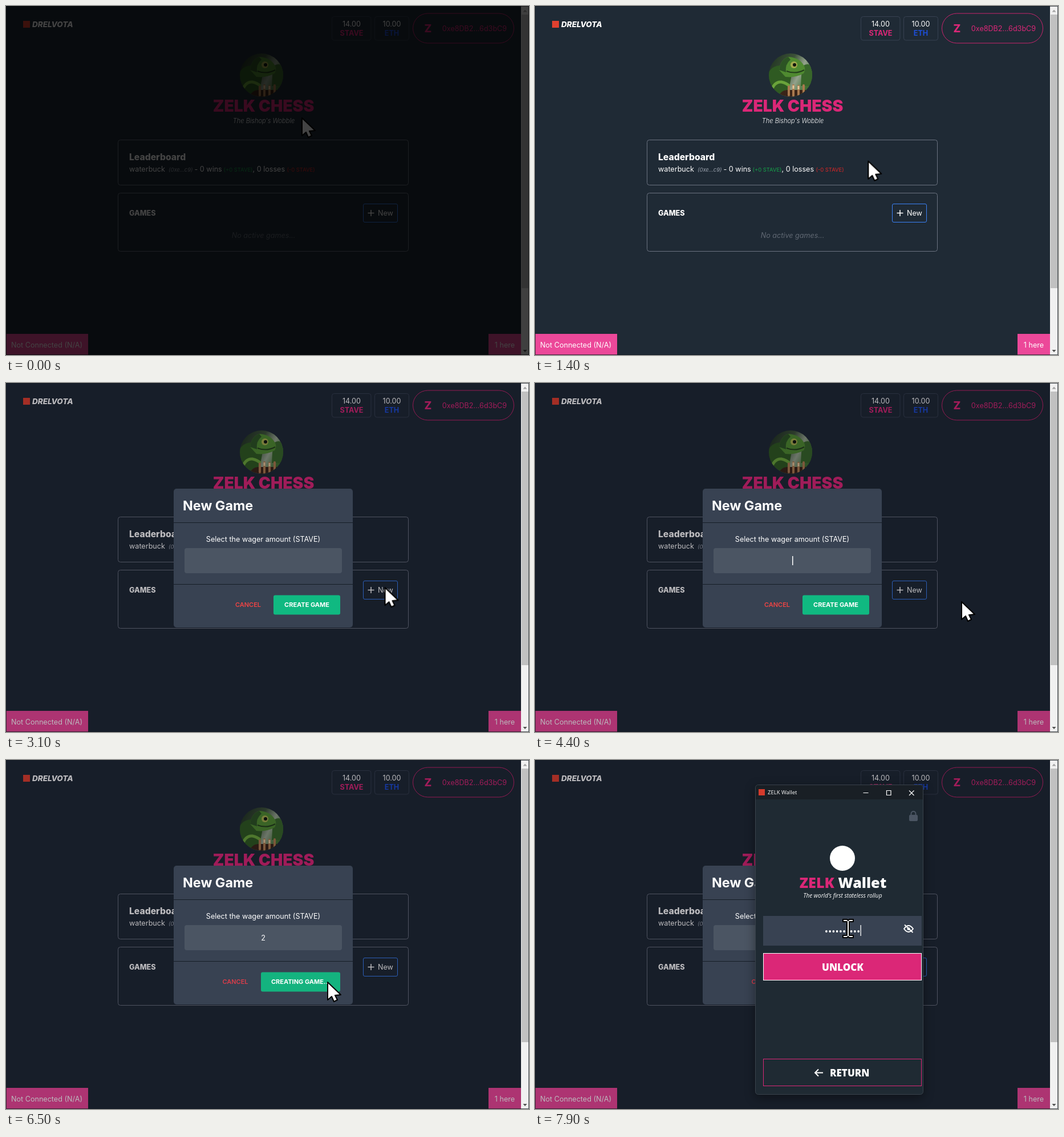
An HTML page for the animation above (8000 ms loop, 917x611 px).

```html
<!DOCTYPE html>
<html lang="en">
<head>
<meta charset="utf-8">
<title>Chess lobby</title>
<style>
  html, body { margin: 0; width: 100%; height: 100%; overflow: hidden; background: #1f2a35; }
  svg { display: block; width: 100%; height: 100%; }
  text { font: 400 12.6px Inter, sans-serif; fill: #fff; white-space: pre; }
  .mid { text-anchor: middle; }
  .bold { font-weight: 700; }
  .heavy { font-weight: 800; }
  .italic { font-style: italic; }
  .small { font-size: 11px; }
  .tiny { font-size: 9.44px; }
  .pink { fill: #db2777; }
  .outline { fill: none; stroke: #6b7280; }
  .badge { fill: none; stroke: #374151; }
  .wallet { filter: drop-shadow(0 5px 9px rgba(0, 0, 0, .4)); }
  .wallet text { font-family: "Open Sans", sans-serif; }
  .wallet .button { font-size: 17px; font-weight: 800; }
  .icon { fill: none; stroke: #fff; stroke-width: 1.2; }
  .pointer path { fill: #fff; stroke: #000; stroke-width: 2; stroke-linejoin: round; }
</style>
</head>
<body>
<svg viewBox="0 0 917 611" preserveAspectRatio="none">
  <defs>
    <clipPath id="round"><circle cx="448" cy="121" r="38"/></clipPath>
    <linearGradient id="leaves" x2="1" y2=".5">
      <stop offset="0" stop-color="#1c2f1e"/>
      <stop offset=".5" stop-color="#3c5138"/>
      <stop offset=".75" stop-color="#93a28c"/>
      <stop offset="1" stop-color="#3f6f31"/>
    </linearGradient>
  </defs>

  <rect width="917" height="611" fill="#1f2a35"/>

  <!-- header -->
  <rect x="30" y="26" width="12" height="12" fill="#e0402f"/>
  <text class="heavy italic" x="46" y="37" style="font-size:13.5px">DRELVOTA</text>
  <rect class="badge" x="571.5" y="18.5" width="68.5" height="41.5" rx="4"/>
  <text class="mid" x="606" y="36">14.00</text>
  <text class="mid bold pink" x="606" y="51.5">STAVE</text>
  <rect class="badge" x="646.5" y="18.5" width="60" height="41.5" rx="4"/>
  <text class="mid" x="676.5" y="36">10.00</text>
  <text class="mid bold" x="676.5" y="51.5" style="fill:#1d4ed8">ETH</text>
  <rect x="713.5" y="13" width="177" height="52" rx="26" fill="none" stroke="#c8246d"/>
  <text class="mid heavy pink" x="740" y="46" style="font-size:18.9px">Z</text>
  <text class="mid pink" x="821.5" y="44">0xe8DB2...6d3bC9</text>

  <!-- picture -->
  <g clip-path="url(#round)">
    <rect x="410" y="83" width="76" height="76" fill="url(#leaves)"/>
    <path d="M468 106q10-8 20 0v34h-22z" fill="#38662a"/>
    <path d="M408 160v-40q6-16 24-16l18 16-4 22-12 18z" fill="#2f5a22"/>
    <path d="M428 112q2-18 16-23 20 1 28 16 3 6-1 13-14 8-32 6z" fill="#4f8a30"/>
    <path d="M428 112q2-18 16-23l4 5q-10 8-8 22z" fill="#2c5424"/>
    <path d="M441 114q16 6 31-2" fill="none" stroke="#233f1c" stroke-width="2"/>
    <circle cx="454" cy="103" r="6" fill="#a3ab4c"/>
    <circle cx="455" cy="103" r="3" fill="#11160e"/>
    <path d="M414 150q5-18 18-17 9 2 14 7" fill="none" stroke="#6aa33a" stroke-width="5"/>
    <path d="M426 160q4-12 16-13h36v13z" fill="#3a2418"/>
    <path d="M445 156v-15m8 16v-18m9 18v-17m9 14v-15" stroke="#a9794e" stroke-width="4" stroke-linecap="round"/>
    <path d="M453 139v6m9-5v6" stroke="#e2c79c" stroke-width="3"/>
  </g>

  <text class="mid pink" x="451.5" y="185" style="font-size:28.3px;font-weight:900">ZELK CHESS</text>
  <text class="mid small italic" x="452" y="205" style="font-weight:300">The Bishop's Wobble</text>

  <!-- cards -->
  <rect class="outline" x="196.5" y="234.5" width="509" height="79" rx="4"/>
  <text class="heavy" x="216" y="269.5" style="font-size:15.7px">Leaderboard</text>
  <text x="216" y="289.8">waterbuck</text>
  <text class="tiny italic" x="285" y="289.5" style="fill:#9ca3af">(0xe...c9)</text>
  <text x="330.5" y="289.8">- 0 wins</text>
  <text class="tiny" x="381.5" y="289.5" style="fill:#16a34a">(+0 STAVE)</text>
  <text x="432.5" y="289.8">, 0 losses</text>
  <text class="tiny" x="492.5" y="289.5" style="fill:#dc2626">(-0 STAVE)</text>

  <rect class="outline" x="196.5" y="327.5" width="509" height="102" rx="4"/>
  <text class="heavy" x="216" y="367">GAMES</text>
  <text class="mid italic" x="451.5" y="405.5" style="fill:#606873">No active games...</text>
  <rect x="626.5" y="346.5" width="60" height="32" rx="2.5" fill="none" stroke="#3b82f6"/>
  <rect data-show="2000-2500" x="626" y="346" width="61" height="33" rx="3" fill="#3b82f6"/>
  <path d="M634.5 362.5h11m-5.5-5.5v11" stroke="#fff" stroke-width="1.5"/>
  <text x="652" y="367">New</text>

  <!-- status bars -->
  <rect y="574" width="144" height="37" fill="#ec4899"/>
  <text x="9" y="597.6">Not Connected (N/A)</text>
  <rect x="846" y="574" width="57" height="37" fill="#ec4899"/>
  <text class="mid" x="874.5" y="597.6">1 here</text>

  <!-- dialog -->
  <g id="dialog">
    <rect width="903" height="611" fill="rgb(4,2,14)" fill-opacity=".27"/>
    <rect x="294" y="185" width="314" height="243" rx="5" fill="#384252"/>
    <path d="M294 244.5h314M294 352.5h314" stroke="#161d27"/>
    <text class="bold" x="310" y="223" style="font-size:23.4px">New Game</text>
    <text class="mid" x="451" y="278">Select the wager amount (STAVE)</text>
    <rect x="313" y="289" width="276" height="44" rx="4" fill="#4b5563"/>
    <rect data-show="2400-2900 3400-3900 4400-4700" x="451" y="303" width="1.5" height="16" fill="#fff"/>
    <text data-show="4700-8000" class="mid" x="451" y="315.5">2</text>
    <rect data-show="4700-5200 5700-6200" x="455" y="303" width="1.5" height="16" fill="#fff"/>
    <g data-show="0-6200">
      <text class="mid small" x="424.5" y="392" style="fill:#ef4444;font-weight:600">CANCEL</text>
      <rect x="469" y="371.5" width="117" height="34" rx="3" fill="#10b981"/>
      <text class="mid small bold" x="527.5" y="392">CREATE GAME</text>
    </g>
    <g data-show="6200-8000">
      <text class="mid small" x="402" y="392" style="fill:#dc3d4a;font-weight:600">CANCEL</text>
      <rect x="447" y="371.5" width="139" height="34" rx="3" fill="#14b37f"/>
      <text class="mid small bold" x="516.5" y="392">CREATING GAME...</text>
    </g>
  </g>

  <!-- scrollbar -->
  <rect x="903" width="14" height="611" fill="#f1f1f1"/>
  <rect x="904" y="15" width="12" height="479" fill="#c1c1c1"/>
  <path d="M906.5 10.5h7l-3.5-4z" fill="#a3a3a3"/>
  <path d="M906.5 602h7l-3.5 4z" fill="#505050"/>

  <!-- browser window edge -->
  <rect x=".5" y=".5" width="916" height="610" fill="none" stroke="#11181f" stroke-opacity=".75"/>

  <!-- wallet window -->
  <g id="wallet" class="wallet">
    <rect x="386.5" y="43.5" width="294" height="542" rx="5" fill="#1f2a33" stroke="#39424b"/>
    <path d="M387 69V49q0-5 5-5h283q5 0 5 5v20z" fill="#191f25"/>
    <rect x="392" y="51" width="11" height="11" fill="#d43b2c"/>
    <text x="408" y="60" style="font-size:9.5px">ZELK Wallet</text>
    <path class="icon" d="M575.5 57.5h9M616.5 53.5h7.5v8h-7.5zM656 53.5l8.500 8.500m0-8.500l-8.500 8.500"/>
    <text data-show="6600-6800" x="387.5" y="81" style="font-size:9.6px;fill:#0c1116">loading..</text>
    <g data-show="6800-8000">
      <rect x="656" y="96" width="15" height="11" rx="2" fill="#4b5563"/>
      <path d="M659.5 97v-3a4 4 0 0 1 8 0v3" fill="none" stroke="#4b5563" stroke-width="2"/>
      <circle cx="539" cy="172" r="22" fill="#fff"/>
      <text class="mid heavy" x="540" y="223.5" style="font-size:25.2px"><tspan class="pink">ZELK</tspan> Wallet</text>
      <text class="mid italic" x="539.5" y="241" style="font-size:10px">The world's first stateless rollup</text>
      <rect x="400" y="273" width="278" height="52" fill="#384252"/>
      <path class="icon" style="stroke-width:1.8" d="M647 295.500q8-11 16 0-8 11-16 0zM648 288.500l14.500 13.500"/>
      <circle cx="655" cy="295.5" r="2.5" fill="#fff"/>
      <g id="password"></g>
      <rect x="400.5" y="338.5" width="277" height="47" fill="#db2777" stroke="#fff"/>
      <text class="mid button" x="539.5" y="369">UNLOCK</text>
      <rect x="400.5" y="523.5" width="277" height="47" fill="none" stroke="#db2777"/>
      <path class="icon" style="stroke-width:2" d="M505 547.500h-14m6-6l-6 6 6 6"/>
      <text class="button" x="517" y="553.5">RETURN</text>
    </g>
  </g>

  <!-- pointer, with its hot spot at 0,0 -->
  <g id="pointer" class="pointer">
    <path data-show="0-2000 2500-5700 6200-7500" d="M0 0V31L7 25 11 34 17 31 13 23 23 22Z"/>
    <g data-show="2000-2500 5700-6200">
      <path d="M-4 4q0-4 3.500-4t3.500 4v10q5-2 5.500 2 5-2 5.500 2 4-1 4 3v9q0 5-4 9H-3q-1-4-5-8l-5-7q-2-4 1-5 3-1 8 4z"/>
      <path d="M3 14v7M8.500 16v6M14 18v5" style="stroke-width:1.5"/>
    </g>
    <path data-show="7500-8000" d="M-9-16H-2L0-14 2-16H9V-12H2V12H9V16H2L0 14-2 16H-9V12H-2V-12H-9Z"/>
  </g>

  <rect id="fade" width="917" height="611"/>
</svg>
<script>
  const LOOP = 8000;
  const find = id => document.getElementById(id);

  // Each key is [time in ms, properties].
  function play(el, keys, easing = 'linear') {
    const last = keys[keys.length - 1];
    if (last[0] < LOOP) keys = [...keys, [LOOP, last[1]]];
    const frames = keys.map(([time, props]) => ({ offset: time / LOOP, easing, ...props }));
    el.animate(frames, { duration: LOOP, iterations: Infinity });
  }

  function showDuring(el, spans) {
    const keys = spans[0][0] > 0 ? [[0, { opacity: 0 }]] : [];
    for (const [from, to] of spans) {
      keys.push([from, { opacity: 1 }]);
      if (to < LOOP) keys.push([to, { opacity: 0 }]);
    }
    play(el, keys, 'step-end');
  }

  // Password length from each time on; the bullets stay centred.
  const typed = [[6800, 0], [7500, 3], [7600, 5], [7700, 7], [7800, 8], [7900, 10]];
  find('password').innerHTML = typed.map(([from, count], i) => {
    const to = i + 1 < typed.length ? typed[i + 1][0] : LOOP;
    return `<g data-show="${from}-${to}">
      <text class="mid" x="539" y="306" style="font-size:16.6px">${'•'.repeat(count)}</text>
      <rect x="${539 + count * 3.15}" y="289" width="1.3" height="19" fill="#fff"/></g>`;
  }).join('');

  for (const el of document.querySelectorAll('[data-show]')) {
    showDuring(el, el.dataset.show.split(' ').map(span => span.split('-').map(Number)));
  }

  play(find('fade'), [[0, { opacity: .74 }], [400, { opacity: 0 }]]);
  play(find('dialog'), [[0, { opacity: 0 }], [2450, { opacity: 0 }], [2800, { opacity: 1 }]]);
  play(find('wallet'), [[0, { opacity: 0 }], [6550, { opacity: 0 }], [6680, { opacity: 1 }]]);

  const at = (x, y) => ({ transform: `translate(${x}px, ${y}px)` });
  play(find('pointer'), [
    [0, at(519, 196)], [650, at(519, 196)],
    [2200, at(657, 356)], [2950, at(657, 356)],
    [3700, at(748, 383)], [5050, at(748, 383)],
    [5900, at(564, 389)], [7250, at(564, 389)],
    [7600, at(549, 295)]
  ], 'ease-in-out');
</script>
</body>
</html>
```
